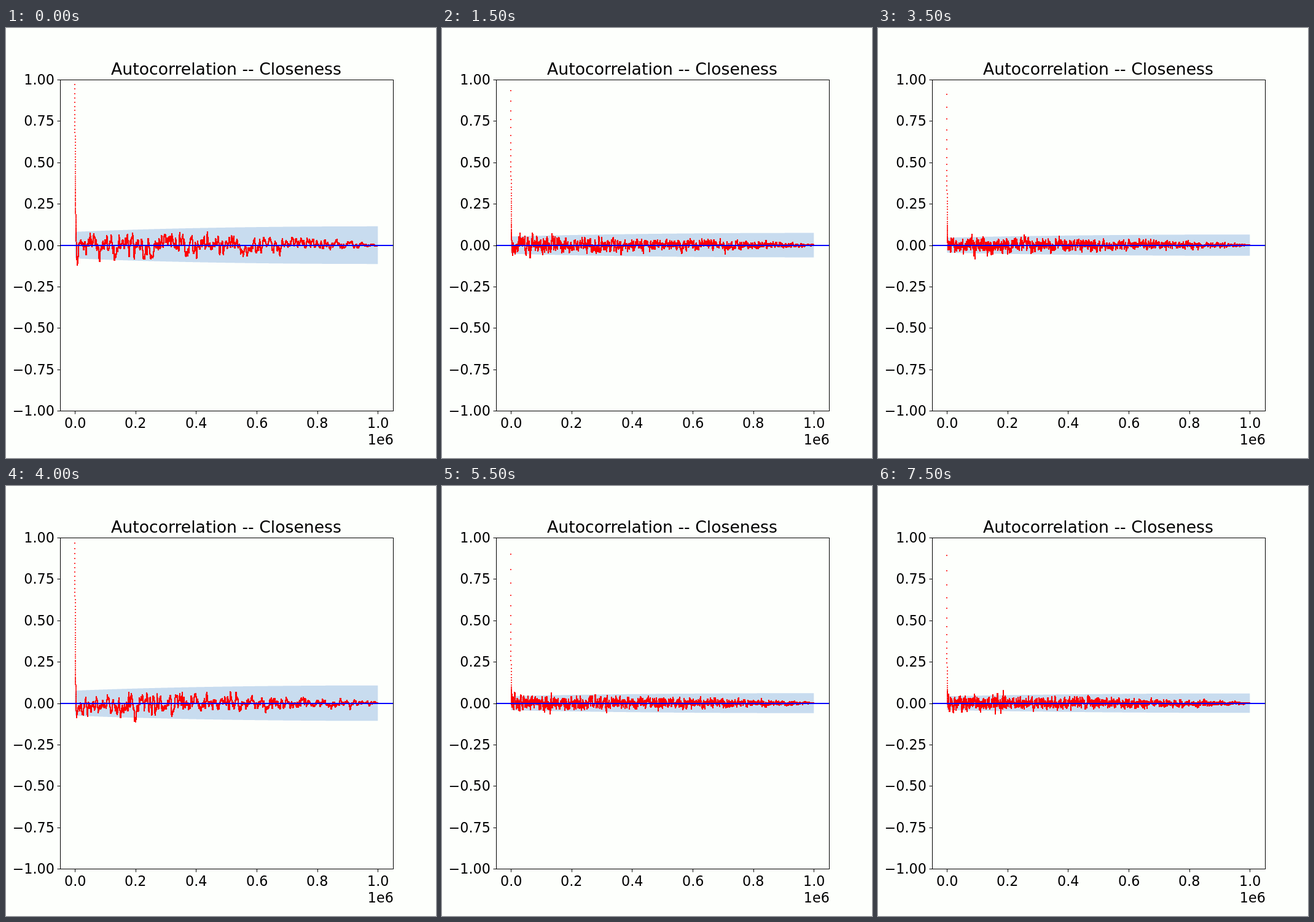
An HTML page with a canvas that plays this animation: 700 by 700 pixels, repeating every 8 s.

```html
<!DOCTYPE html>
<html lang="en">
<head>
<meta charset="utf-8">
<title>Autocorrelation</title>
<style>
  html, body { margin: 0; width: 100%; height: 100%; overflow: hidden; background: #fdfffc; }
  canvas, svg { position: absolute; left: 0; top: 0; width: 700px; height: 700px; }
  text { font: 22.22px "DejaVu Sans", sans-serif; fill: #000; }
  .title { font-size: 26.67px; }
</style>
</head>
<body>
<canvas id="plot" width="700" height="700"></canvas>
<svg id="axes" viewBox="0 0 700 700">
  <path d="M88 354H630" stroke="#00f" stroke-width="2.08"/>
  <rect x="88.5" y="84.5" width="542" height="539" fill="none" stroke="#000"/>
  <text class="title" x="358.5" y="76" text-anchor="middle">Autocorrelation -- Closeness</text>
  <text x="630.8" y="678" text-anchor="end">1e6</text>
</svg>
<script>
const STEP = 500;
const LAGS = 20000;
const X0 = 112.16, WIDTH = 493.18;
const TOP = 84, UNIT = 269.5, ZERO = TOP + UNIT;

// Lag-one correlation of each chain: four rounds, each from slow to fast mixing
const rates = [
  .9707, .952, .937, .932,
  .9705, .941, .922, .911,
  .967, .944, .915, .8996,
  .967, .934, .915, .8944
];

const ctx = document.getElementById("plot").getContext("2d");
const axes = document.getElementById("axes");
const lagX = k => X0 + k / LAGS * WIDTH;

function add(tag, attrs, text = "") {
  const el = document.createElementNS("http://www.w3.org/2000/svg", tag);
  for (const key in attrs) el.setAttribute(key, attrs[key]);
  el.textContent = text;
  axes.append(el);
}

function drawAxes() {
  for (let i = 0; i <= 8; i++) {
    const y = Math.round(TOP + i * UNIT / 4);
    const label = (1 - i / 4).toFixed(2).replace("-", "\u2212");
    add("path", { d: `M83.5 ${y + .5}H88`, stroke: "#000" });
    add("text", { x: 78.8, y: y + 8, "text-anchor": "end" }, label);
  }
  for (let i = 0; i <= 5; i++) {
    const x = X0 + i * WIDTH / 5;
    add("path", { d: `M${Math.round(x) + .5} 624V628.5`, stroke: "#000" });
    add("text", { x: Math.round(x - 17.4), y: 651 }, (i / 5).toFixed(1));
  }
}

function random(seed) {
  let s = seed;
  return () => {
    s = (s + 0x6D2B79F5) | 0;
    let t = Math.imul(s ^ (s >>> 15), s | 1);
    t ^= t + Math.imul(t ^ (t >>> 7), t | 61);
    return ((t ^ (t >>> 14)) >>> 0) / 4294967296;
  };
}

// Smooth noise with the correlation length of the chain, fading with the lag
function makeNoise(seed, r, size) {
  const rnd = random(seed);
  const q = r * r;
  const gain = size * Math.sqrt((1 - q) ** 3 / (1 + q));
  const noise = new Float64Array(LAGS);
  let a = 0, b = 0;
  for (let k = 1; k < LAGS; k++) {
    const e = (rnd() + rnd() + rnd() + rnd() - 2) * Math.sqrt(3);
    [a, b] = [2 * r * a - q * b + e, a];
    noise[k] = a * gain * Math.sqrt(1 - k / LAGS);
  }
  return noise;
}

function drawBand(r, base) {
  const half = k => base * Math.sqrt(2 - r ** (2 * k + 2) - (1 - k / LAGS) ** 2);
  ctx.fillStyle = "#c8dcef";
  ctx.beginPath();
  for (let k = 0; k <= LAGS; k += 10) ctx.lineTo(lagX(k), ZERO - half(k));
  for (let k = LAGS; k >= 0; k -= 10) ctx.lineTo(lagX(k), ZERO + half(k));
  ctx.fill();
}

function drawChain(index) {
  const r = rates[index];
  const sigma = UNIT * Math.sqrt((1 + r * r) / (1 - r * r) / LAGS);
  const noise = makeNoise(index * 97 + 11, r, sigma);
  ctx.clearRect(0, 0, 700, 700);
  ctx.save();
  ctx.beginPath();
  ctx.rect(88, 84, 542, 539);
  ctx.clip();
  drawBand(r, 1.96 * sigma);
  ctx.fillStyle = "#f00";
  for (let k = 0; k < LAGS; k++) {
    const y = ZERO - UNIT * r ** k - noise[k];
    ctx.beginPath();
    ctx.arc(Math.round(lagX(k)), Math.round(y), 1.04, 0, 7);
    ctx.fill();
  }
  ctx.restore();
}

let shown = -1;
function tick() {
  const index = Math.floor(performance.now() / STEP) % rates.length;
  if (index !== shown) drawChain(shown = index);
  requestAnimationFrame(tick);
}

drawAxes();
tick();
</script>
</body>
</html>
```
